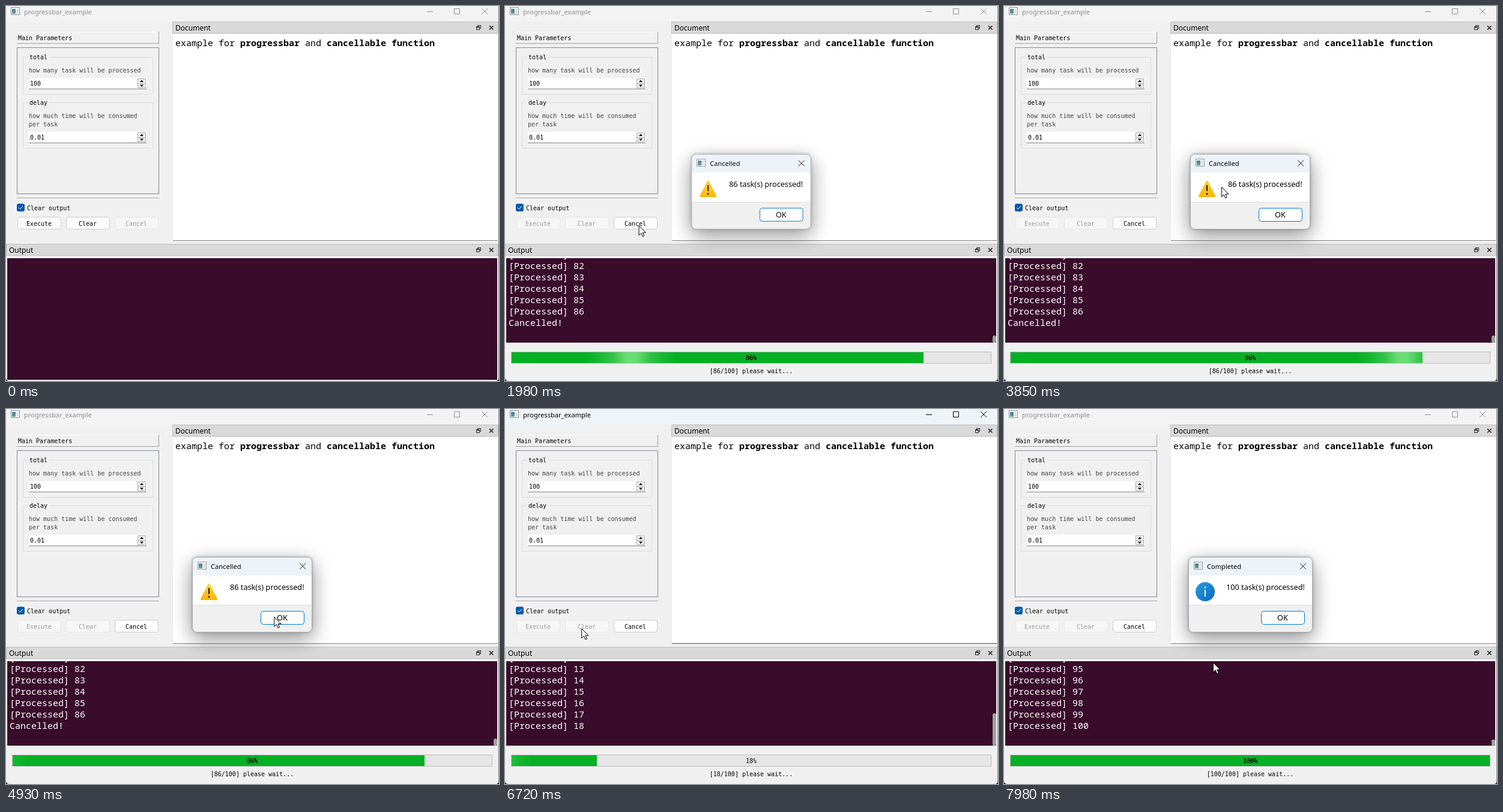
Write an HTML page that moves like this. It is 821x626 px and loops after 8 s.

```html
<!DOCTYPE html>
<html lang="en">
<head>
<meta charset="utf-8">
<title>progressbar_example</title>
<style>
  html, body { margin: 0; width: 100%; height: 100%; overflow: hidden; background: #f0f0f0; }
  svg { display: block; }
  text { white-space: pre; }
  .ui { font: 12px "Noto Sans", "Open Sans", sans-serif; }
  .caption { font-size: 11.1px; }
  .message { font-size: 12.7px; }
  .form { font: 10px "DejaVu Sans Mono", "Liberation Mono", monospace; }
  .code { font: 15px "Noto Sans Mono", "DejaVu Sans Mono", monospace; }
  .mid { text-anchor: middle; }
  .thin { fill: none; stroke-width: 1; }
  .shadow { filter: drop-shadow(0 10px 17px rgba(0, 0, 0, .36)) drop-shadow(0 0 2px rgba(0, 0, 0, .3)); }
</style>
</head>
<body>
<svg id="stage" width="821" height="626" viewBox="0 0 821 626">
  <defs>
    <clipPath id="paneClip"><rect id="paneClipBox" x="2" y="421" width="816" height="203"/></clipPath>
    <clipPath id="fillClip"><rect id="fillClipBox" x="11" y="578" width="0" height="18"/></clipPath>
    <linearGradient id="glowPaint">
      <stop offset="0" stop-color="#7be583" stop-opacity="0"/>
      <stop offset=".15" stop-color="#7be583" stop-opacity=".14"/>
      <stop offset=".3" stop-color="#7be583" stop-opacity=".38"/>
      <stop offset=".45" stop-color="#7be583" stop-opacity=".85"/>
      <stop offset=".55" stop-color="#7be583" stop-opacity=".85"/>
      <stop offset=".7" stop-color="#7be583" stop-opacity=".38"/>
      <stop offset=".85" stop-color="#7be583" stop-opacity=".14"/>
      <stop offset="1" stop-color="#7be583" stop-opacity="0"/>
    </linearGradient>
    <linearGradient id="iconPaint" x2="0" y2="1">
      <stop stop-color="#3f76a8"/><stop offset="1" stop-color="#6aa48c"/>
    </linearGradient>
    <linearGradient id="warnPaint" x2="0" y2="1">
      <stop stop-color="#ffd02a"/><stop offset="1" stop-color="#fbb507"/>
    </linearGradient>
    <linearGradient id="infoPaint" x2="1" y2="1">
      <stop stop-color="#2a9be6"/><stop offset="1" stop-color="#0669bd"/>
    </linearGradient>
  </defs>
</svg>
<script>
const LOOP = 8000;
const TASK_MS = 13;
const FADE_MS = 170;
const LINE = 19;
const PANE_TOP = 421;
const GLOW_HALF = 76;

const RUNS = [
  { start: 750, tasks: 86, close: 5420, title: 'Cancelled', x: 310, w: 200, log: ['Cancelled!'] },
  { start: 6482, tasks: 100, close: Infinity, title: 'Completed', x: 307, w: 207, log: [] },
];

// Pointer tip: time, x, y
const POINTER = [
  [70, 400, 626], [300, 262, 456], [520, 112, 384], [650, 62, 364], [880, 62, 364],
  [1200, 130, 385], [1430, 204, 391], [1760, 222, 366], [1980, 222, 366],
  [2300, 390, 385], [2620, 460, 339], [2760, 447, 363], [3300, 204, 443], [3450, 204, 443],
  [3600, 235, 414], [3850, 362, 302], [4050, 372, 284], [4260, 377, 288],
  [4730, 446, 346], [5430, 447, 348], [5580, 394, 360], [5850, 282, 364],
  [6300, 62, 364], [6500, 62, 364], [6720, 127, 366], [7420, 300, 400], [7980, 348, 423],
];

const rect = (x, y, w, h, fill, more = '') =>
  `<rect x="${x}" y="${y}" width="${w}" height="${h}" fill="${fill}" ${more}/>`;
const box = (x, y, w, h, stroke, fill = 'none', r = 0, more = '') =>
  rect(x + .5, y + .5, w - 1, h - 1, fill, `stroke="${stroke}" rx="${r}" ${more}`);
const text = (x, y, cls, str, fill = '#000', more = '') =>
  `<text x="${x}" y="${y}" class="${cls}" fill="${fill}" ${more}>${str}</text>`;
const path = (d, stroke, more = '') => `<path d="${d}" class="thin" stroke="${stroke}" ${more}/>`;

const appIcon = (x, y) =>
  box(x, y, 15, 13, '#8c9399', '#f7f8f9') + rect(x + 2, y + 3, 6, 8, 'url(#iconPaint)') +
  rect(x + 9, y + 3, 4, 8, '#dfe3e6');

const dock = (x, y, w, name) =>
  box(x, y, w, 20, '#c0c0c0', '#d9d9d9') + text(x + 5, y + 15, 'ui', name) +
  path(`M785.5 ${y + 8.5}v-2h5v5h-2M783.5 ${y + 8.5}h5v5h-5zM783.5 ${y + 9.5}h5M785.5 ${y + 6.5}h5`, '#222') +
  path(`M805 ${y + 7}l6.5 6.5m0-6.5l-6.5 6.5`, '#222', 'style="stroke-width:1.6"');

const group = (y, h, name) =>
  box(28, y, 217, h, '#dcdcdc') + rect(36, y - 2, 36, 5, '#f0f0f0') + text(39, y + 4, 'form', name);

const spin = (y, value) =>
  rect(38, y, 196, 19, '#fff') + rect(38, y + 18, 196, 1, '#868686') +
  box(219, y + 1, 14, 16, '#adadad', '#f0f0f0') + rect(219, y + 9, 14, 1, '#adadad') +
  `<path d="M223 ${y + 7}h6l-3-3.5zM223 ${y + 11.5}h6l-3 3.5z"/>` + text(40, y + 13, 'form', value);

const button = (id, x, name) =>
  `<g id="${id}">` + box(x, 352, 73, 21, '#d0d0d0', '#fdfdfd', 3.5) +
  text(x + 36, 367, 'form mid', name) + '</g>';

const warning =
  '<path d="M338 293 L350.5 317.5 H325.5 Z" fill="url(#warnPaint)" stroke="url(#warnPaint)" stroke-width="3" stroke-linejoin="round"/>' +
  path('M338 299v10', '#1c1c1c', 'style="stroke-width:2"') + '<circle cx="338" cy="313.5" r="1.5" fill="#1c1c1c"/>';
const info =
  '<circle cx="335" cy="305" r="16" fill="url(#infoPaint)"/><circle cx="335" cy="298" r="1.4" fill="#fff"/>' +
  path('M335 302v11', '#fff', 'style="stroke-width:2"');

function dialog(run, i) {
  const { x, w } = run, r = x + w;
  return `<g id="dialog${i}" class="shadow">` +
    rect(x, 247, w, 126, '#f0f0f0', 'rx="8"') +
    `<path d="M${x} 278v-23q0-8 8-8h${w - 16}q8 0 8 8v23z" fill="#eef3f9"/>` +
    rect(x, 278, w, 49, '#fff') + rect(x, 327, w, 1, '#dfdfdf') +
    box(x, 247, w, 126, '#a9abad', 'none', 7.5) +
    appIcon(x + 9, 255) + text(x + 31, 267, 'ui caption', run.title) +
    path(`M${r - 21} 257.5l10 10m0-10l-10 10`, '#111') +
    (i ? info : warning) +
    text(x + 63, 302, 'ui message', `${run.tasks} task(s) processed!`) +
    box(r - 86, 337, 73, 23, '#0078d4', '#fdfdfd', 4) +
    text(r - 50, 353, 'ui message mid', 'OK') + '</g>';
}

const stage = document.getElementById('stage');
stage.insertAdjacentHTML('beforeend',
  rect(0, 0, 821, 626, '#f0f0f0') +
  rect(0, 0, 821, 26, '#eff4f9', 'id="titlebar"') + appIcon(8, 2) +
  '<g id="caption">' + text(30, 14, 'ui caption', 'progressbar_example', 'currentColor') +
  path('M701 9.5h10M746.5 4.5h9v9h-9zM792 4l10 10m0-10l-10 10', 'currentColor') + '</g>' +

  rect(18, 43, 237, 1, '#fff') + rect(18, 62, 237, 1, '#a0a0a0') + rect(254, 43, 1, 20, '#a0a0a0') +
  text(20, 57, 'form', 'Main Parameters') +
  box(18, 69, 237, 245, '#828790') +
  group(85, 63, 'total') + text(38, 111, 'form', 'how many task will be processed', '#444') + spin(120, '100') +
  group(161, 77, 'delay') + text(38, 187, 'form', 'how much time will be consumed', '#444') +
  text(38, 201, 'form', 'per task', '#444') + spin(210, '0.01') +
  rect(18, 320, 237, 1, '#a0a0a0') + rect(18, 321, 237, 1, '#fff') +
  rect(18, 330, 13, 13, '#005aae', 'rx="3"') + path('M21 336.5l2.5 2.5 4.5-5', '#fff') +
  text(35, 341, 'form', 'Clear output') +
  button('execute', 19, 'Execute') + button('clear', 100, 'Clear') + button('cancel', 181, 'Cancel') +

  rect(277, 46, 543, 346, '#ececec') + rect(278, 47, 541, 344, '#fff') +
  rect(278, 391, 541, 1, '#868686', 'id="underline"') +
  dock(277, 26, 543, 'Document') +
  text(282, 67, 'code', 'example for <tspan font-weight="700">progressbar</tspan> and <tspan font-weight="700">cancellable function</tspan>') +

  dock(0, 397, 820, 'Output') +
  rect(1, 420, 818, 205, '#fafafa', 'id="paneEdge"') + rect(2, PANE_TOP, 816, 203, '#380c2a', 'id="pane"') +
  '<g id="log" clip-path="url(#paneClip)"></g>' + rect(812, 0, 6, 0, '#a0a0a0', 'id="thumb" rx="2.5"') +

  '<g id="progress">' + box(10, 577, 800, 20, '#bcbcbc', '#e6e6e6') +
  '<text id="percent" x="410" y="591" class="form mid"></text><g clip-path="url(#fillClip)">' +
  rect(11, 578, 798, 18, '#06b025') + rect(0, 578, 2 * GLOW_HALF, 18, 'url(#glowPaint)', 'id="glow"') +
  '<text id="percentUnder" x="410" y="591" class="form mid"></text>' +
  '<text id="percentOver" x="410" y="591" class="form mid"></text></g>' +
  '<text id="status" x="410" y="613" class="form mid"></text></g>' +

  rect(820, 0, 1, 626, '#8a8a8a') +
  '<path d="M0 620q0 6 6 6h-6zM821 620q0 6-6 6h6z" fill="#222"/>' +
  RUNS.map(dialog).join('') +
  '<path id="pointer" d="M.5 .5v16l3.7-3.5 2.5 5.7 2.5-1.1-2.5-5.5h5z" fill="#fff" stroke="#000" stroke-width="1"/>');

const $ = id => document.getElementById(id);
const set = (id, attrs) => { for (const k in attrs) $(id).setAttribute(k, attrs[k]); };
const show = (id, on) => $(id).style.display = on ? '' : 'none';
const clamp = v => Math.min(1, Math.max(0, v));
const easeOut = p => 1 - (1 - p) ** 3;

const logLines = Array.from({ length: 13 }, () => {
  $('log').insertAdjacentHTML('beforeend', text(6, 0, 'code', '', '#fff'));
  return $('log').lastChild;
});

function enable(id, on) {
  const [frame, label] = $(id).children;
  frame.setAttribute('fill', on ? '#fdfdfd' : '#f6f6f6');
  frame.setAttribute('stroke', on ? '#cdcdcd' : '#e6e6e6');
  label.setAttribute('fill', on ? '#000' : '#9b9b9b');
}

function drawLog(run, count, busy) {
  const lines = [];
  if (run) {
    for (let i = 1; i <= count; i++) lines.push(`[Processed] ${i}`);
    if (count === run.tasks) lines.push(...run.log);
    lines.push(busy ? '' : 'function result: None');
  }
  const height = busy ? 141 : 203;
  const total = lines.length * LINE + 8;
  const scroll = Math.max(0, total - height);
  const first = Math.floor(scroll / LINE);
  set('pane', { height });
  set('paneEdge', { height: height + 2 });
  set('paneClipBox', { height });
  logLines.forEach((el, i) => {
    const n = first - 1 + i;
    el.textContent = lines[n] || '';
    el.setAttribute('y', PANE_TOP + 18 + n * LINE - scroll);
  });
  const thumb = scroll ? height * height / total : 0;
  set('thumb', { y: PANE_TOP + height - thumb, height: thumb });
}

function drawProgress(run, count, t, active) {
  const glow = -89 + .243 * ((t - run.start) % 3988);
  set('fillClipBox', { width: Math.max(0, 8 * count - 2) });
  set('glow', { x: glow - GLOW_HALF });
  show('glow', count < 100);
  for (const id of ['percent', 'percentUnder', 'percentOver']) $(id).textContent = `${count}%`;
  set('percentOver', { fill: active ? '#fff' : '#000' });
  $('status').textContent = `[${count}/100] please wait...`;
}

function drawDialog(run, i, t) {
  const open = run.start + run.tasks * TASK_MS;
  const visible = t >= open && t < run.close + FADE_MS;
  show(`dialog${i}`, visible);
  if (!visible) return;
  const closing = t >= run.close;
  const p = closing ? clamp((t - run.close) / FADE_MS) : easeOut(clamp((t - open) / FADE_MS));
  const scale = closing ? 1 - .064 * p : .9 + .1 * p;
  const [cx, cy] = closing ? [360, 290] : [410, 310];
  set(`dialog${i}`, {
    opacity: closing ? 1 - p : p,
    transform: `translate(${cx} ${cy}) scale(${scale}) translate(${-cx} ${-cy})`,
  });
}

function drawPointer(t) {
  show('pointer', t >= POINTER[0][0]);
  const next = POINTER.findIndex(p => p[0] >= t);
  const k = next < 0 ? POINTER.length - 1 : Math.max(1, next);
  const [a, b] = [POINTER[k - 1], POINTER[k]];
  const p = clamp((t - a[0]) / (b[0] - a[0]));
  set('pointer', { transform: `translate(${a[1] + (b[1] - a[1]) * p} ${a[2] + (b[2] - a[2]) * p})` });
}

function draw(t) {
  const run = RUNS.filter(r => t >= r.start).pop();
  const count = run ? Math.min(run.tasks, Math.floor((t - run.start) / TASK_MS)) : 0;
  const busy = !!run && t < run.close;
  const active = t >= 660 && !(busy && count === run.tasks);

  set('titlebar', { fill: active ? '#eff4f9' : '#f3f3f3' });
  set('underline', { fill: active ? '#005fb8' : '#868686' });
  $('caption').style.color = active ? '#000' : '#8f8f8f';
  enable('execute', !busy);
  enable('clear', !busy);
  enable('cancel', busy);
  drawLog(run, count, busy);
  show('progress', busy);
  if (busy) drawProgress(run, count, t, active);
  RUNS.forEach((r, i) => drawDialog(r, i, t));
  drawPointer(t);
}

const begin = performance.now();
function tick() {
  draw((performance.now() - begin) % LOOP);
  requestAnimationFrame(tick);
}
tick();
</script>
</body>
</html>
```
